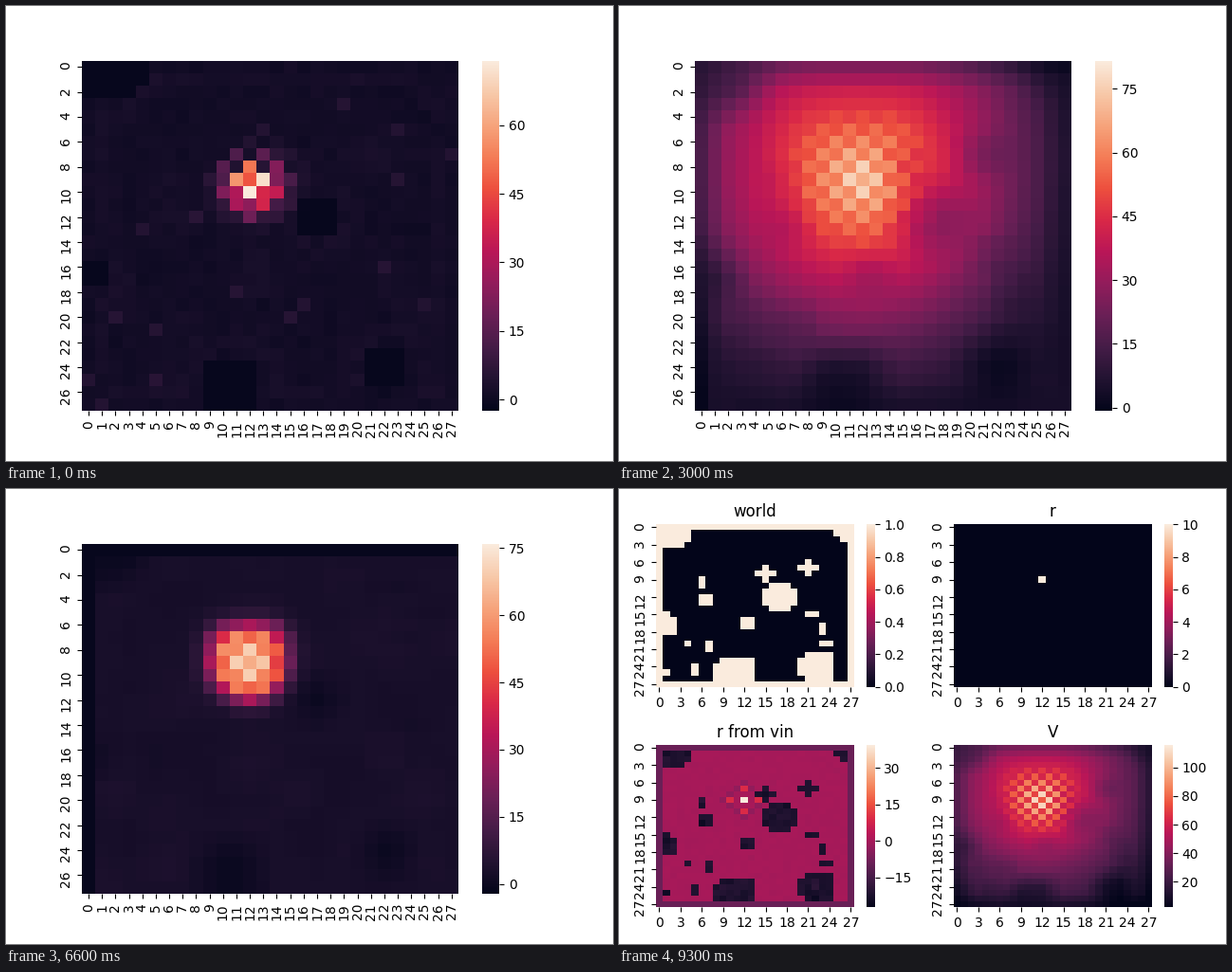
Animation, 640 px wide and 480 px high, one loop 9.6 s. Source, as a matplotlib script:

```python
import numpy as np
import matplotlib.pyplot as plt
from matplotlib.animation import FuncAnimation
from matplotlib.colors import LinearSegmentedColormap
from matplotlib.ticker import MaxNLocator

N = 28
GOAL = (9, 12)

tones = """03051a 221331 451c47 6a1f56 921c5b b91657
           d92847 ed503e f47d57 f6a47c f7c9aa faebdd""".split()
ROCKET = LinearSegmentedColormap.from_list("rocket", ["#" + c for c in tones])

rng = np.random.default_rng(4)
rows, cols = np.mgrid[:N, :N]
noise = rng.normal(0, 1, (N, N))

# --- grid world: border plus round obstacles (row, column, radius) ---------
DISCS = [
    (-.5, 1, 4.15), (1, 26, 1), (8, 15, 1), (7, 21, 1), (12, 17, 2.4),
    (9.5, 6, .6), (12.5, 6.5, .8), (16.5, 12.5, .8), (15, 21.5, .6),
    (17.5, 23, .6), (20, 23.5, .6), (16.8, 1, 1.81), (20, 4, .5),
    (20.5, 7, .6), (24.5, 5, .6), (25, 1, .5), (25, 10.8, 3), (24, 22.2, 2.7),
]
border = (rows % (N - 1) == 0) | (cols % (N - 1) == 0)
blocks = np.any([np.hypot(rows - r, cols - c) <= rad for r, c, rad in DISCS], axis=0)
world = (border | blocks).astype(float)
reward = np.zeros((N, N))
reward[GOAL] = 10


def blur(grid):
    """Mean over each cell and its eight neighbours."""
    p = np.pad(grid, 1, mode="edge")
    return sum(p[i:i + N, j:j + N] for i in range(3) for j in range(3)) / 9


solid = blur(world)

# --- value function, as fractions of the colour range ----------------------
dy, dx = rows - GOAL[0], cols - GOAL[1]
odd = (dx + dy) % 2 == 1
power = np.where(dy > 0, 2, 3)
reach_x = np.abs(dx) * np.where(dx > 0, 1.1, 1)
dist = (np.abs(dy) ** power + reach_x ** power) ** (1 / power)


def glow(peak, rate, wall, ripple):
    """Decay from the goal, dimmed by walls, with a checkered core."""
    checker = np.where(odd, ripple, -ripple) * np.clip(1 - dist / 6, 0, 1)
    return peak * np.exp(-rate * dist) * (1 - (dist / 30) ** 4) - wall * solid + checker


settled = glow(.93, .08, .15, .09)

base = .046 + .035 * solid * (solid < .6) + .005 * noise
base[blur(blocks * 1.) > .75] = .012
base += .05 * (rng.random((N, N)) < .015)
later = blur(base) + .012
later[0] = later[:, 0] = .012

# the first sweep only lights a checkered spot just below the goal
spot = 1.15 * np.exp(-((dy - .4) ** 2 + (dx - .2) ** 2) / 3.6)
first = base + spot * np.where(odd, 1, np.where(dy < 0, .1, .55))


def value_map(n):
    """Value map after n sweeps, with its lower and upper bound."""
    marks = [1, 4, 8, 15, 20, 27]
    lo = np.interp(n, marks, [-2.5, -2.1, -1.8, -1.65, -.55, -.2])
    hi = np.interp(n, marks, [74.1, 77, 74.1, 78.8, 82.3, 84.5])
    if n == 1:
        t = first
    else:
        front = 1 / (1 + np.exp((dist - .8 * n - .6) * 7 / n))
        t = later + (settled - later) * front
    return lo + np.clip(t, 0, 1) * (hi - lo), lo, hi


# --- recovered reward and final value --------------------------------------
taxi = np.abs(dx) + np.abs(dy)
vin = .41 + .003 * noise
vin[taxi == 3] = .36
vin[(taxi == 2) & (dx * dy == 0)] = .55
vin[blocks] = .08 + .015 * noise[blocks]
vin[border] = .27
vin[GOAL] = 1
vin = -27.4 + 67 * vin

final = 2 + 114 * np.clip(glow(.85, .088, .1, .2), 0, 1)

# --- drawing ---------------------------------------------------------------
fig = plt.figure(figsize=(6.4, 4.8), dpi=100)


def heatmap(spec, data, lo, hi, xstep, ystep, title=""):
    ax = fig.add_subplot(spec)
    mesh = ax.pcolormesh(data, cmap=ROCKET, vmin=lo, vmax=hi)
    ax.set(xlim=(0, N), ylim=(N, 0), title=title)
    xt, yt = np.arange(0, N, xstep), np.arange(0, N, ystep)
    ax.set_xticks(xt + .5, xt, rotation=90 if xstep == 1 else 0)
    ax.set_yticks(yt + .5, yt, rotation=90)
    ax.spines[:].set_visible(False)
    bar = fig.colorbar(mesh, ax=ax, ticks=MaxNLocator(6))
    bar.outline.set_linewidth(0)
    return mesh, [ax, bar.ax]


panels = [
    (world, 0, 1, "world"),
    (reward, 0, 10, "r"),
    (vin, -27.4, 39.6, "r from vin"),
    (final, 2, 116, "V"),
]
grid = fig.add_gridspec(2, 2)
summary_axes = []
for spec, (data, lo, hi, title) in zip(grid, panels):
    summary_axes += heatmap(spec, data, lo, hi, 3, 3, title)[1]
grid.tight_layout(fig)

main, main_axes = heatmap(fig.add_gridspec(1, 1)[0], *value_map(1), 1, 2)

# sweeps play in the alphabetical order of their numbers
ORDER = sorted(range(1, 31), key=str)


def draw(i):
    sweeping = i < len(ORDER)
    for ax in main_axes:
        ax.set_visible(sweeping)
    for ax in summary_axes:
        ax.set_visible(not sweeping)
    if sweeping:
        data, lo, hi = value_map(ORDER[i])
        main.set_array(data)
        main.set_clim(lo, hi)
    return []


anim = FuncAnimation(fig, draw, frames=32, interval=300, repeat=True,
                     repeat_delay=0, blit=False)
plt.show()
```
